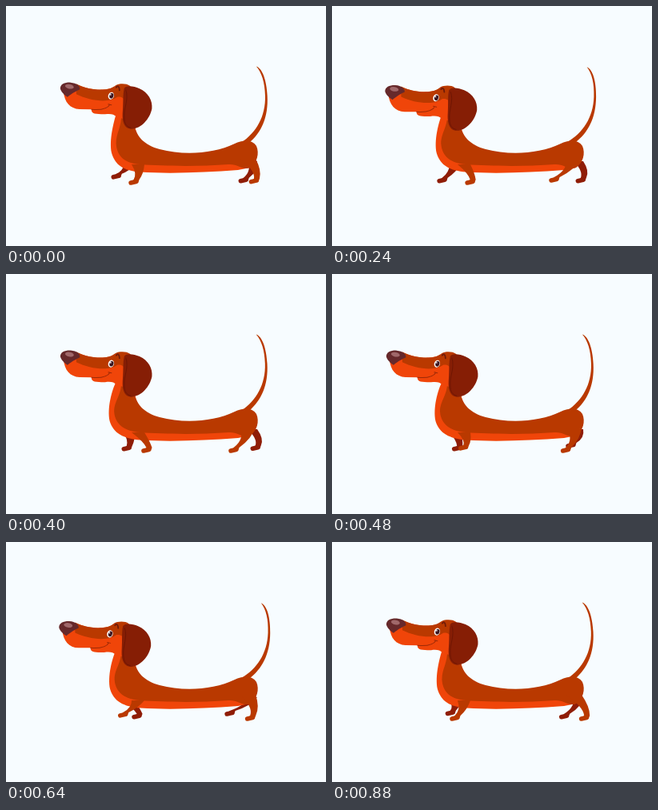
Recreate the animation shown at these times as an HTML page with a canvas. Size 400 by 300 pixels, loop 960 ms.

```html
<!DOCTYPE html>
<html lang="en">
<head>
<meta charset="utf-8">
<style>
html, body { margin: 0; width: 100%; height: 100%; overflow: hidden; background: #f7fcff; }
canvas { display: block; }
</style>
</head>
<body>
<canvas id="stage" width="400" height="300"></canvas>
<script>
const ctx = document.getElementById('stage').getContext('2d');
const LOOP = 960, STEP = 40, STANCE = 620;
const COAT = '#b93900', BELLY = '#f04509', FAR = '#8f1d07', EAR = '#861e05', NOSE = '#66292b';

// Each foot slides from front to back, then swings forward again; start is when it lands
const legs = {
  farFront:  { hipX: 154, hipY: 198, half: 7, bend: 2, start: 150, front: 125, back: 161, ground: 218.7, color: FAR },
  farHind:   { hipX: 308, hipY: 194, half: 6, bend: 6, start: 730, front: 272, back: 309, ground: 218.7, color: FAR },
  nearFront: { hipX: 165, hipY: 198, half: 8, bend: 3, start: 745, front: 138, back: 171, ground: 221, color: COAT },
  nearHind:  { hipX: 302, hipY: 191, half: 10, bend: 7, start: 310, front: 271, back: 311, ground: 221, color: COAT }
};

const shapes = {
  tail: 'M304 171C319 158 328 139 326.3 112C325.3 93 320 78 312.3 75.5C319 83 323 95 323.6 112C324.5 138 313 158 294 171Z',
  face: 'M72 106C73 120 80 128 92 128.8L107 129C106 135 114 135 124 135C131 134 135 135 138 138L162 146L164 105L147 98C139 99 132 104 121 104.3C106 105 98 101 88 98Z',
  crown: 'M88 97C98 102 107 104.5 121 104.3C134 104 136 98 141 97.4C146 96.5 152 97 155 99.5L160 105L158 128C147 123 151 112 139 113.5C130 121 106 119 88 110Z',
  nose: 'M68 103C68 97 74 95 81 95.3C89 96 93 100 92.5 104C88 106 84 108 77 113.5C73 111 69 107 68 103Z',
  ear: 'M148 102.5C151 98.5 160 100 167 103C178 108 183.5 118 182.5 128C180 141 169 153 157 153.5C147 153 145 143 146 131C147 120 146 110 148 102.5Z',
  earFold: 'M150 105C154 116 147 128 148 139C148 147 151 151 156 152',
  mouth: 'M107 129C118 130 127 128 130 123M128 122.5L132 123.5',
  brow: 'M138 101.5C140 98.5 142 101 142 105'
};
for (const name in shapes) shapes[name] = new Path2D(shapes[name]);

function fill(path, color) {
  ctx.fillStyle = color;
  ctx.fill(path);
}

function stroke(path, color, width) {
  ctx.strokeStyle = color;
  ctx.lineWidth = width;
  ctx.stroke(path);
}

function oval(x, y, rx, ry, color, turn = 0) {
  const path = new Path2D();
  path.ellipse(x, y, rx, ry, turn, 0, 2 * Math.PI);
  fill(path, color);
}

function turned(x, y, angle, dx, dy, draw) {
  ctx.save();
  ctx.translate(x + dx, y + dy);
  ctx.rotate(angle);
  ctx.translate(-x, -y);
  draw();
  ctx.restore();
}

const easeOut = u => Math.sin(u * Math.PI / 2);

function toe({ start, front, back, ground }, t) {
  const phase = (t - start + LOOP) % LOOP;
  if (phase < STANCE) return [front + (back - front) * easeOut(phase / STANCE), ground];
  const u = (phase - STANCE) / (LOOP - STANCE);
  return [back + (front - back) * easeOut(u), ground - 5 * Math.sin(Math.PI * u)];
}

function drawLeg(leg, t) {
  const { hipX, hipY, half, bend, color } = leg;
  const [x, y] = toe(leg, t);
  const ankleX = x + 8, ankleY = y - 4;
  const kneeX = (hipX + ankleX) / 2 + bend, kneeY = (hipY + ankleY) / 2 + 2;
  const limb = new Path2D(), paw = new Path2D();
  limb.moveTo(hipX - half, hipY);
  limb.quadraticCurveTo(kneeX - 3, kneeY, ankleX - 3.5, ankleY);
  limb.lineTo(x + 1, y);
  limb.lineTo(ankleX + 2, y);
  limb.lineTo(ankleX + 3.5, ankleY);
  limb.quadraticCurveTo(kneeX + 5, kneeY, hipX + half, hipY);
  fill(limb, color);
  paw.moveTo(x + 1, y);
  paw.lineTo(ankleX - 0.5, y - 1.5);
  stroke(paw, color, 5.6);
}

function body(t) {
  const chest = 129.3 + 1.3 * Math.cos(2 * Math.PI * t / LOOP);
  const back = 'L160 146C162 164 174 174 192 179C222 187 259 185 286 172C296 167 308 167 313 175C317 184 314 196 305 202';
  fill(new Path2D(`M138 134C${chest + 4} 145 ${chest - 2} 168 ${chest + 1.5} 184C${chest + 6} 199 147 206 168 207.5C205 210 250 208 290 205L305 202L313 180L286 178C259 188 222 190 192 182C174 177 164 168 160 146Z`), BELLY);
  fill(new Path2D(`M144 134${back}C296 206 290 197 278 198C240 201 195 200 168 198C149 197 ${chest + 8} 188 ${chest + 7} 172C${chest + 7} 158 145 151 144 134Z`), COAT);
}

function head() {
  fill(shapes.face, BELLY);
  fill(shapes.crown, COAT);
  fill(shapes.nose, NOSE);
  oval(79.5, 100.3, 5.5, 2.8, '#a0686a', 0.2);
  oval(131.5, 112, 3.6, 4.6, '#fff', 0.3);
  oval(132, 112, 2.5, 3.4, '#3b1520', 0.3);
  oval(131, 110.6, 0.8, 0.9, '#fff');
  stroke(shapes.mouth, '#9c2a08', 1);
  stroke(shapes.brow, '#6f1b08', 1.8);
  fill(shapes.ear, EAR);
  stroke(shapes.earFold, '#6d1604', 0.9);
}

function draw(t) {
  const sway = 0.5 + 0.5 * Math.cos(2 * Math.PI * (t - 195) / 480);
  ctx.fillStyle = '#f7fcff';
  ctx.fillRect(0, 0, 400, 300);
  ctx.lineCap = ctx.lineJoin = 'round';
  drawLeg(legs.farFront, t);
  drawLeg(legs.farHind, t);
  turned(305, 168, 0.075 * sway, 0, 0, () => fill(shapes.tail, COAT));
  body(t);
  drawLeg(legs.nearFront, t);
  drawLeg(legs.nearHind, t);
  turned(155, 150, -0.018 * sway, -sway, 2.6 * sway, head);
}

function frame(now) {
  const t = Math.floor(now % LOOP / STEP) * STEP;
  draw(Math.min(t, 880));
  requestAnimationFrame(frame);
}
frame(performance.now());
</script>
</body>
</html>
```
